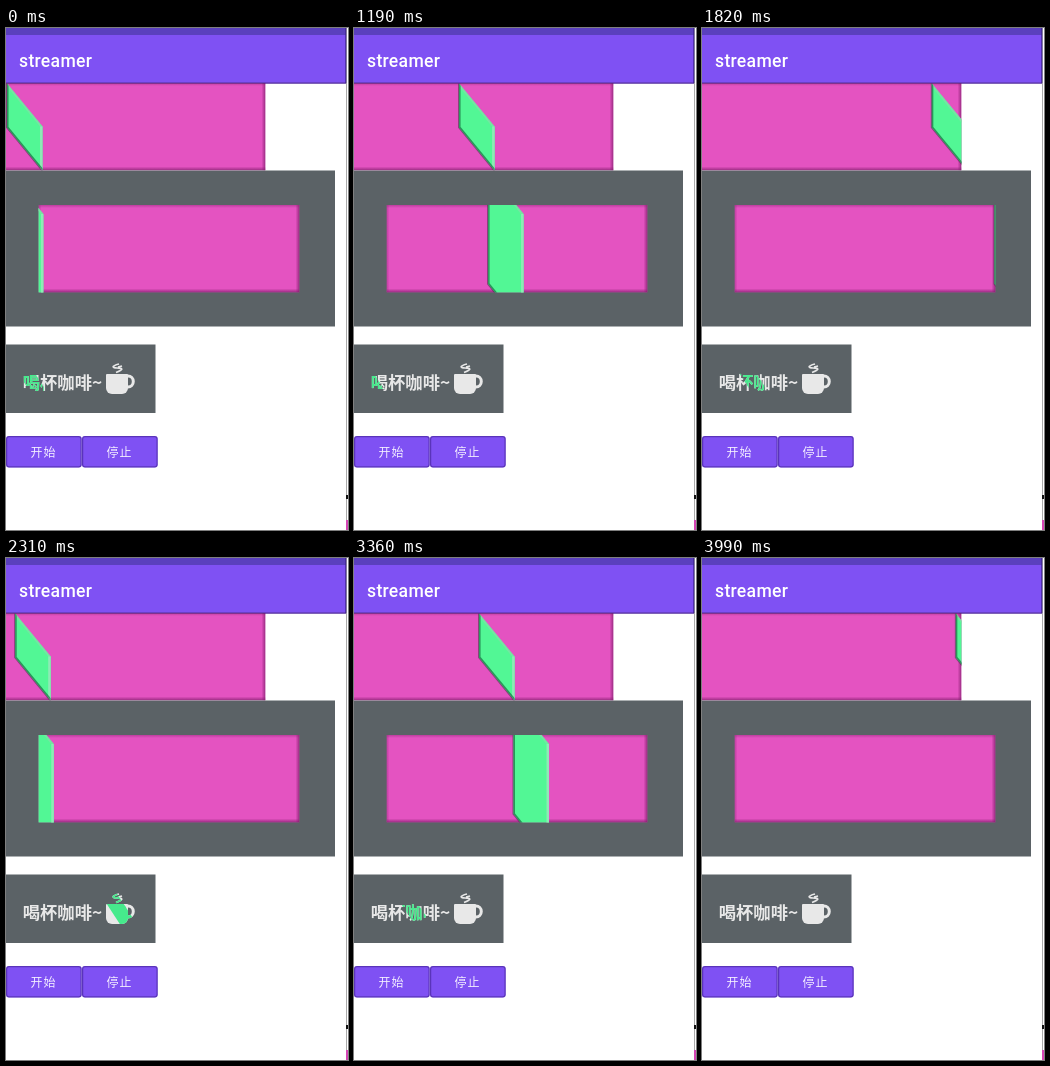
An HTML page with a canvas that plays this animation: 342x502 px, repeating every 4060 ms.

```html
<!DOCTYPE html>
<html lang="zh">
<head>
<meta charset="utf-8">
<title>streamer</title>
<style>
  html, body { margin: 0; width: 100%; height: 100%; overflow: hidden; background: #fff; }
  canvas { display: block; width: 342px; height: 502px; }
</style>
</head>
<body>
<canvas id="stage" width="342" height="502"></canvas>
<script>
const ctx = document.getElementById('stage').getContext('2d');
const LOOP = 4060, STEP = 70;
const SLANT = 43, PANEL_BAND = 35.5, TEXT_BAND = 28;
const PURPLE = '#7f51f3', PINK = '#e453c1', GREY = '#5b6266', GREEN = '#52f795';
const CJK = '"Noto Sans CJK SC", "Noto Sans CJK", sans-serif';

// [time, progress] through each sweep; two entries at the same time mark a restart.
const boxSweep = [[0, .063], [560, .356], [1190, .637], [1820, .942], [1925, .99],
  [1925, .005], [2800, .422], [3360, .695], [3990, .99], [4060, 1.02]];
const textSweep = [[0, .258], [1092, .985], [1092, 0], [2540, .965],
  [2540, 0], [4005, .977], [4005, 0], [4060, .04]];

function progress(keys, t) {
  let i = 1;
  while (i < keys.length - 1 && t >= keys[i][0]) i++;
  const [t0, p0] = keys[i - 1], [t1, p1] = keys[i];
  return p0 + (p1 - p0) * (t - t0) / (t1 - t0);
}

const accelerate = p => p * p;

function rect(x, y, w, h, color) {
  ctx.fillStyle = color;
  ctx.fillRect(x, y, w, h);
}

function line(points, color, width) {
  ctx.beginPath();
  points.forEach(([x, y]) => ctx.lineTo(x, y));
  ctx.strokeStyle = color;
  ctx.lineWidth = width;
  ctx.stroke();
}

function label(text, x, y, font, color, spacing = 0) {
  ctx.font = font;
  ctx.letterSpacing = spacing + 'px';
  ctx.fillStyle = color;
  ctx.fillText(text, x, y);
}

function fade(x, y, w, h, dx, dy, color) {
  const g = ctx.createLinearGradient(x, y, x + dx, y + dy);
  g.addColorStop(0, color);
  g.addColorStop(1, 'rgba(140,35,115,0)');
  rect(x, y, w, h, g);
}

function bandPoints(x, width, top, bottom) {
  return [[x, top], [x + width, top + SLANT], [x + width, bottom], [x, bottom - SLANT]];
}

function bandPath(points) {
  ctx.beginPath();
  points.forEach(([x, y]) => ctx.lineTo(x, y));
  ctx.closePath();
}

// A pink panel with a slanted green band passing across it.
function panel(x, y, w, h, bandX, top, bottom) {
  ctx.save();
  ctx.beginPath();
  ctx.rect(x, y, w, h);
  ctx.clip();

  rect(x, y, w, h, PINK);
  const dark = 'rgba(130,30,110,.8)', soft = 'rgba(140,35,115,.45)';
  fade(x + w, y, -4, h, -4, 0, dark);
  fade(x, y + h, w, -4, 0, -4, dark);
  fade(x, y, w, 3, 0, 3, soft);
  if (x > 0) fade(x, y, 3, h, 3, 0, soft);

  const points = bandPoints(bandX, PANEL_BAND, top, bottom);
  const [a, b, c, d] = points;
  line([c, d, a], 'rgba(70,45,70,.6)', 2);
  bandPath(points);
  ctx.fillStyle = GREEN;
  ctx.fill();
  ctx.clip();
  line([a, b], 'rgba(125,225,165,.8)', 4);
  line([b, c], '#8eeab6', 5);
  line([c, d, a], 'rgba(25,110,65,.7)', 3);
  ctx.restore();
}

function cup(color) {
  ctx.fillStyle = color;
  ctx.beginPath();
  ctx.roundRect(100, 346, 22, 20, [1, 1, 6, 6]);
  ctx.fill();
  ctx.beginPath();
  ctx.ellipse(122, 353.5, 5.3, 5.5, 0, 0, Math.PI * 2);
  ctx.strokeStyle = color;
  ctx.lineWidth = 3;
  ctx.stroke();
  ctx.beginPath();
  ctx.moveTo(113, 336);
  ctx.bezierCurveTo(105, 338, 106, 340, 111, 340);
  ctx.bezierCurveTo(118, 340, 117, 342, 110, 344.5);
  ctx.moveTo(116, 338);
  ctx.lineTo(112, 339);
  ctx.lineWidth = 1.7;
  ctx.stroke();
}

function coffee(color) {
  label('喝杯咖啡~', 16.8, 361, 'bold 17.3px ' + CJK, color);
  cup(color);
}

function button(x, text) {
  ctx.save();
  ctx.fillStyle = PURPLE;
  ctx.beginPath();
  ctx.roundRect(x, 408, 75.7, 31.5, 3);
  ctx.fill();
  ctx.clip();
  ctx.strokeStyle = 'rgba(60,30,140,.55)';
  ctx.lineWidth = 2.5;
  ctx.stroke();
  ctx.restore();
  label(text, x + 24.5, 428.5, '500 12px ' + CJK, '#f4efff', 1);
}

function chrome() {
  rect(0, 0, 342, 502, '#fff');
  rect(0, 0, 340.5, 55.5, PURPLE);
  rect(0, 0, 340, 7, '#5a40bd');
  label('streamer', 13, 38.5, '500 17.6px Roboto, sans-serif', '#fff', .3);
  rect(340, 0, 1, 502, '#aaa');
  rect(339, 0, 1.5, 55, 'rgba(60,35,140,.7)');
  rect(340, 467, 2, 4, '#111');
  rect(340, 492, 2, 10, '#d545b5');
}

function draw(t) {
  const f = accelerate(progress(boxSweep, t));
  chrome();
  panel(0, 55, 259.5, 87.5, 259 * f, 55.5, 142.5);
  rect(0, 54.5, 340, 1.2, 'rgba(70,35,120,.75)');
  rect(0, 142.5, 329, 156, GREY);
  panel(32.5, 177, 261, 87.5, 329 * f + .6, 143, 299);

  rect(0, 316.5, 149.5, 68.5, GREY);
  coffee('#e8e8e8');
  ctx.save();
  bandPath(bandPoints(149 * accelerate(progress(textSweep, t)), TEXT_BAND, 316, 385));
  ctx.clip();
  coffee('#46ea8c');
  ctx.restore();

  button(0, '开始');
  button(76, '停止');
}

const start = performance.now();
function tick() {
  const t = (performance.now() - start) % LOOP;
  draw(Math.floor(t / STEP) * STEP);
  requestAnimationFrame(tick);
}
tick();
</script>
</body>
</html>
```
